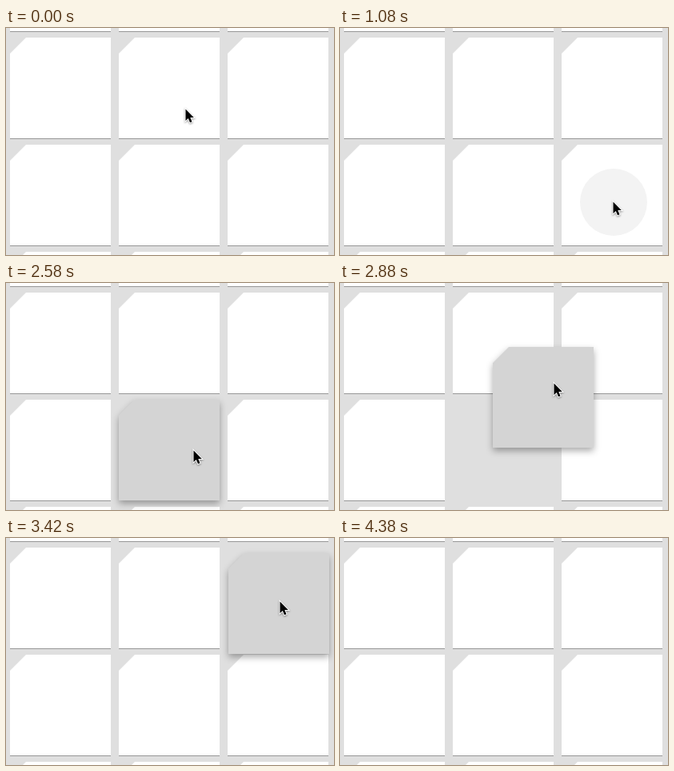
An HTML page that plays this animation: 410x284 px, repeating every 4.68 s.

```html
<!DOCTYPE html>
<html lang="en">
<head>
<meta charset="utf-8">
<title>Draggable cards</title>
<style>
  html, body { margin: 0; width: 100%; height: 100%; overflow: hidden; background: #dfdfdf; }
  #stage { position: relative; width: 410px; height: 284px; overflow: hidden; }
  .card {
    position: absolute; left: 0; top: 0; width: 126px; height: 126px;
    filter: drop-shadow(0 1px .7px rgba(0, 0, 0, .32));
  }
  .face {
    position: absolute; inset: 0; overflow: hidden; background: #fff;
    clip-path: polygon(20px 0, 100% 0, 100% 100%, 0 100%, 0 20px);
  }
  .ripple {
    position: absolute; width: 200px; height: 200px; margin: -100px;
    border-radius: 50%; background: #000; opacity: 0;
  }
  #cursor {
    position: absolute; left: 0; top: 0; z-index: 3; overflow: visible;
    filter: drop-shadow(0 1px 1px rgba(0, 0, 0, .4));
  }
</style>
</head>
<body>
<div id="stage">
  <svg id="cursor" width="12" height="19">
    <path d="M.5 .5V15L3.8 11.9 6 17.2 8.5 16.2 6.3 11H10.8Z"
      stroke="#fff" stroke-width="2" paint-order="stroke"/>
  </svg>
</div>
<script>
const LOOP = 4680, TICK = 60;
const stage = document.getElementById('stage');
const cursor = document.getElementById('cursor');
const animations = [];

const at = (x, y) => `translate(${x}px, ${y}px)`;
const slot = (col, row) => at(5 + col * 136, 12 + row * 134);
const shadow = (y, blur, alpha) => `drop-shadow(0 ${y}px ${blur}px rgba(0, 0, 0, ${alpha}))`;

// Each key is [time in ms, value, easing to the next key].
function animate(el, prop, keys) {
  const frames = keys.map(([ms, value, easing = 'linear']) =>
    ({ offset: ms / LOOP, [prop]: value, easing }));
  const first = frames[0], last = frames[frames.length - 1];
  if (first.offset > 0) frames.unshift({ ...first, offset: 0, easing: 'linear' });
  if (last.offset < 1) frames.push({ ...last, offset: 1 });
  const anim = el.animate(frames, { duration: LOOP, iterations: Infinity });
  anim.pause();
  animations.push(anim);
}

function addDiv(parent, className) {
  const el = document.createElement('div');
  el.className = className;
  return parent.appendChild(el);
}

function addCard(col, row) {
  const card = addDiv(stage, 'card');
  card.style.transform = slot(col, row);
  addDiv(card, 'face');
  return card;
}

function addRipple(card, x, y, sizes, alphas) {
  const el = addDiv(card.firstChild, 'ripple');
  el.style.left = x + 'px';
  el.style.top = y + 'px';
  animate(el, 'transform', sizes.map(([ms, r, ease]) => [ms, `scale(${r / 100})`, ease]));
  animate(el, 'opacity', alphas);
}

const cards = {};
for (let row = -1; row < 3; row++)
  for (let col = 0; col < 3; col++) cards[[col, row]] = addCard(col, row);

// Tap on the lower right card
addRipple(cards[[2, 1]], 64.5, 72,
  [[1080, 42], [1440, 120]],
  [[1079, 0], [1080, .05], [1200, .06], [1500, 0]]);

// Long press, drag and drop of the middle card
const dragged = cards[[1, 1]];
dragged.style.zIndex = 2;
addRipple(dragged, 91, 76,
  [[1920, 0], [2280, 150]],
  [[1920, .17], [3780, .17], [4140, 0]]);

const resting = shadow(1, .7, .32), raised = shadow(4, 4, .33);
animate(dragged, 'filter',
  [[1920, resting], [2280, raised], [3780, raised], [4140, resting]]);
animate(dragged, 'transform', [
  [2580, slot(1, 1), 'cubic-bezier(.4,.2,.7,.7)'],
  [2880, at(191, 80), 'cubic-bezier(.3,.4,.6,1)'],
  [3420, at(278, 19)],
  [3780, at(278, 19), 'ease-in-out'],
  [4140, slot(2, 0)]
]);

// The cards in between make room
function shift(card, from, to, z) {
  card.style.zIndex = z;
  animate(card, 'transform', [[3000, slot(...from), 'ease-in-out'], [3360, slot(...to)]]);
}
shift(cards[[2, 0]], [2, 0], [0, 1], 1);
shift(cards[[0, 1]], [0, 1], [1, 1], 0);

const glide = 'cubic-bezier(.65,0,.35,1)';
animate(cursor, 'transform', [
  [0, at(224, 101)],
  [840, at(341, 217)],
  [1080, at(341, 217), glide],
  [1740, at(232, 222)],
  [2520, at(232, 222)],
  [2580, at(234, 209), 'cubic-bezier(.4,.2,.7,.7)'],
  [2880, at(267, 125), 'cubic-bezier(.3,.4,.6,1)'],
  [3420, at(342, 79)],
  [3780, at(342, 79), 'cubic-bezier(.3,.1,.8,.8)'],
  [4320, at(334, 280)],
  [4380, at(333, 304)]
]);

// The picture advances in fixed ticks
const start = performance.now();
function draw() {
  const t = Math.floor((performance.now() - start) % LOOP / TICK) * TICK;
  for (const anim of animations) anim.currentTime = t;
  requestAnimationFrame(draw);
}
draw();
</script>
</body>
</html>
```
